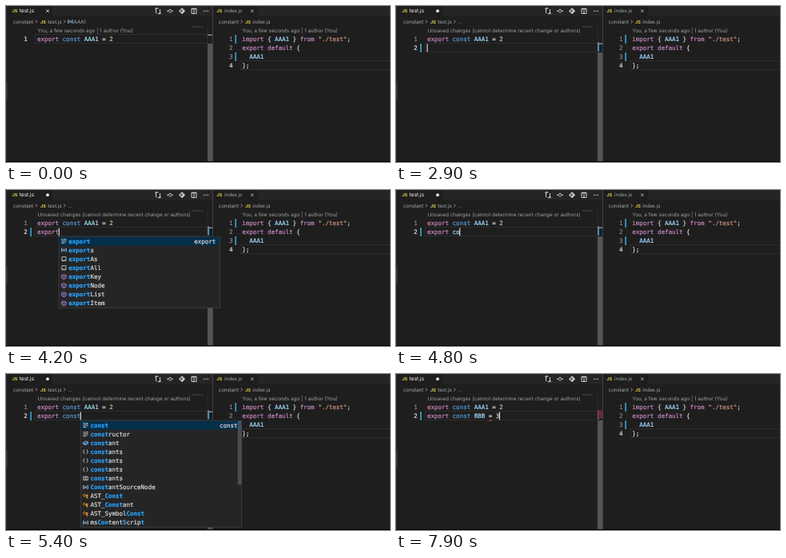
Write an HTML page that moves like this. It is 480 by 195 pixels and loops after 8000 ms.

```html
<!DOCTYPE html>
<html lang="en">
<head>
<meta charset="utf-8">
<title>Editor typing</title>
<style>
  html, body { margin: 0; width: 480px; height: 195px; overflow: hidden; background: #1e1e1e; }
  svg { display: block; text-rendering: geometricPrecision; }
  text { white-space: pre; }
  .ui { font: 6.2px Inter, "Liberation Sans", sans-serif; fill: #acacac; }
  .tab { font-size: 6.5px; fill: #fff; }
  .other { fill: #a8a8a8; }
  .lens { font-size: 6.38px; fill: #a3a3a3; }
  .js { font: 700 5.6px Inter, "Liberation Sans", sans-serif; fill: #e3d04b; }
  .code { font: 7.5px "DejaVu Sans Mono", "Liberation Mono", monospace; color: #dcdcdc; }
  .code, .code tspan { fill: currentColor; stroke: currentColor; stroke-width: .2; }
  .key { color: #c586c0; }
  .decl { color: #569cd6; }
  .name { color: #a4defc; }
  .num { color: #b5cea8; }
  .str { color: #ce9178; }
  .line { color: #858585; }
  .now { color: #e0e0e0; }
  .hit { color: #2aa4ff; font-weight: 700; }
  .icon { fill: none; stroke: #d0d0d0; stroke-width: 1; }
  .thin { stroke-width: .7; }
  .current { fill: none; stroke: #2c2c2c; }
  .changed { fill: #3c93bb; }
</style>
</head>
<body>
<svg id="stage" width="480" height="195" viewBox="0 0 480 195">
  <rect width="480" height="195" fill="#1e1e1e"/>
  <path d="M58 0H258V12.5H58ZM315 0H480V12.5H315Z" fill="#252526"/>
  <rect width="1.6" height="195" fill="#29292a"/>
  <rect y="95" width="1.6" height="22" fill="#3c3c3d"/>
  <path d="M252 25V195" stroke="#2c2c2c" stroke-width=".8"/>
  <rect id="slider" x="252" width="6" height="195" fill="#555"/>
  <path d="M258.5 0V195" stroke="#414141"/>
  <path d="M233 26H246" stroke="#55505c" stroke-width=".9" stroke-dasharray="3 .7"/>
  <rect id="current" class="current" x="36.5" width="215" height="11"/>
  <rect class="current" x="293" y="68.5" width="190" height="11"/>

  <text class="js" x="7.5" y="8.1">JS</text>
  <text class="ui tab" x="16.8" y="8.3">test.js</text>
  <path id="close" class="icon" d="M50.2 4.3L53.9 8M53.9 4.3L50.2 8"/>
  <circle id="dot" cx="52" cy="6.2" r="1.9" fill="#e8e8e8"/>
  <text class="js" x="263.3" y="8.1">JS</text>
  <text class="ui other" x="273" y="8.3">index.js</text>
  <path class="icon thin" d="M306 4.3L309.5 8M309.5 4.3L306 8"/>

  <g class="icon">
    <path d="M187.5 4V9M187.5 3H190.5M192.5 4V9M189.5 9.5H192.5"/>
    <circle cx="187.5" cy="3.4" r=".8"/><circle cx="192.5" cy="9" r=".8"/>
    <path d="M205 4L207.2 6.2L205 8.4L202.8 6.2ZM201 6.2H203M207 6.2H209"/>
    <path d="M220 2.7L223.5 6.2L220 9.7L216.5 6.2Z" fill="#d0d0d0"/>
    <path d="M219 4.6V8M219 5L221 6.4" stroke="#252526"/>
    <path d="M232 3.2H238V9.4H232ZM235 3.2V9.4M232 3.7H238"/>
  </g>
  <path d="M247 6.3H253" stroke="#c5c5c5" stroke-width="1.2" stroke-dasharray="1.2 1.2"/>

  <text class="ui" x="9" y="21.8">constant</text>
  <path class="icon thin" d="M37 17.7L38.8 19.5L37 21.3"/>
  <text class="js" x="43" y="21.6">JS</text>
  <text class="ui" x="52.3" y="21.8">test.js</text>
  <path class="icon thin" d="M72.3 17.7L74.1 19.5L72.3 21.3"/>
  <g id="symbol">
    <path d="M78.8 17.6H77.5V21.4H78.8M82 17.6H83.3V21.4H82M79 18.8H81.8V20.2H79Z" fill="none" stroke="#8fbfe6" stroke-width=".8"/>
    <text class="ui" x="84.6" y="21.8">AAA1</text>
  </g>
  <text id="more" class="ui" x="77" y="21.8">...</text>
  <text class="ui" x="265.6" y="21.8">constant</text>
  <path class="icon thin" d="M293.7 17.7L295.5 19.5L293.7 21.3"/>
  <text class="js" x="299" y="21.6">JS</text>
  <text class="ui" x="308.2" y="21.8">index.js</text>

  <text id="lens" class="ui lens" x="39.5" y="32.6"></text>
  <text class="ui lens" x="295.3" y="32.6">You, a few seconds ago | 1 author (You)</text>
  <g id="right"></g>
  <g id="left"></g>
  <path id="deleted" d="M29.8 44L32 45.8L29.8 47.5Z" fill="#94151b"/>
  <g id="added" class="changed">
    <rect x="30.2" y="47" width="1.8" height="11"/>
    <rect x="252" y="45.5" width="2" height="11"/>
  </g>
  <path class="changed" d="M286.2 36H288V47H286.2ZM286.2 58H288V69H286.2Z"/>
  <rect id="mark" x="252" width="6" height="1.5" fill="#8a8a8c"/>
  <rect id="fault" x="252.5" y="45.5" width="5.5" height="10" fill="#6e2730"/>
  <path id="wave" d="M116 58.2H120.5" stroke="#b05252"/>
  <rect id="cursor" width="1.1" height="9.8" fill="#e4e4e4"/>
  <g id="popup"></g>
  <rect y="194" width="480" height="1"/>
</svg>
<script>
const LOOP = 8000, CHAR = 4.516, LEFT = 39, RIGHT = 295.3, PITCH = 11, ROW = 11.08, MAX_ROWS = 12;
const $ = id => document.getElementById(id);
const span = (cls, s) => `<tspan class="${cls}">${s}</tspan>`;
const baseline = n => 43.7 + (n - 1) * PITCH;
const text = (cls, x, y, s, extra = "") => `<text class="${cls}" x="${x}" y="${y}" ${extra}>${s}</text>`;
const show = (id, on) => $(id).style.display = on ? "" : "none";

// Start time, second line, popup open
const TYPING = [
  [2600, ""], [3300, "e", 1], [3500, "ex", 1], [3700, "exp", 1], [3900, "expo", 1],
  [4000, "expor", 1], [4100, "export", 1], [4400, "export "], [4700, "export c"],
  [4800, "export co"], [4900, "export con", 1], [5100, "export cons", 1],
  [5200, "export const", 1], [5500, "export const "], [6000, "export const B"],
  [6200, "export const BB"], [6300, "export const BBB"], [6700, "export const BBB "],
  [7100, "export const BBB ="], [7400, "export const BBB = "], [7800, "export const BBB = 3"]
];

// Each word follows its icon kind; total is the full length of the scrolled list
const list = s => s.split(" ").map(item => item.split(":"));
const WORDS = {
  e: { total: 50, words: list(
    "k:export v:exports k:extends v:external s:exa s:exd s:exp s:expgql m:exec m:exec m:execFile m:execFileSync " +
    "s:exportAs s:exportAll m:exportKey m:exportNode m:exportList m:exportItem") },
  c: { total: 20, words: list(
    "k:const k:constructor f:constant o:constants o:constants o:constants t:constants v:ConstantSourceNode " +
    "c:AST_Const c:AST_Constant c:AST_SymbolConst v:msContentScript") }
};

const ICONS = {
  k: ["#c5c5c5", "M-3 -2.5H-1M0 -2.5H3M-3 -.8H3M-3 1H0M1 1H3M-3 2.7H1"],
  v: ["#8fbfe6", "M-1.8 -2H-3V2H-1.8M1.8 -2H3V2H1.8M-1.4 -.7H1.4V.8H-1.4Z"],
  s: ["#c5c5c5", "M-2.5 -2.5H2.5V2.5H-2.5ZM-2.5 2H2.5"],
  t: ["#c5c5c5", "M-2.8 -2.2H2.8V2.2H-2.8ZM-1.4 -.7H1.4M-1.4 .8H1.4"],
  m: ["#b180d7", "M0 -3L2.8 -1.5V1.7L0 3.2L-2.8 1.7V-1.5ZM-2.8 -1.5L0 0L2.8 -1.5M0 0V3.2"],
  f: ["#75beff", "M-3 -.5L.5 -2.2L3 -1V1L-.5 2.6L-3 1.3ZM-3 -.5L-.5 .7L3 -1M-.5 .7V2.6"],
  o: ["#c5c5c5", "M-1.2 -2.6Q-2.3 -2.6 -2.2 -1Q-2.2 0 -3 0Q-2.2 0 -2.2 1Q-2.3 2.6 -1.2 2.6M1.2 -2.6Q2.3 -2.6 2.2 -1Q2.2 0 3 0Q2.2 0 2.2 1Q2.3 2.6 1.2 2.6"],
  c: ["#ee9d28", "M-1.5 -2.6L.2 -.9L-1.5 .8L-3.2 -.9ZM0 -.9H2.5M1 -.9V1.8H2.5M2 -1.7L3 -.9L2 0ZM2 1L3 1.8L2 2.6Z"]
};

function paint(line) {
  const colours = { export: "key", import: "key", default: "key", from: "key", const: "decl" };
  return line.replace(/"[^"]*"|[A-Za-z]\w*|\d+/g, s =>
    span(s[0] === '"' ? "str" : /^\d/.test(s) ? "num" : colours[s] || "name", s));
}

function highlight(word, typed) {
  const low = word.toLowerCase(), at = low.indexOf(typed);
  let k = 0;
  return [...word].map((ch, i) => {
    const hit = at >= 0 ? i >= at && i < at + typed.length : low[i] === typed[k];
    if (hit) k++;
    return hit ? span("hit", ch) : ch;
  }).join("");
}

function popup(x, typed) {
  const top = 58.2, width = 201.5;
  const { total, words } = WORDS[typed[0]];
  const loose = new RegExp([...typed].join(".*"), "i");
  const rows = words.filter(([, word]) => loose.test(word)).slice(0, MAX_ROWS);
  const height = rows.length * ROW;
  let out = `<rect x="${x}" y="${top}" width="${width}" height="${height + .4}" fill="#252526" stroke="#454545" stroke-width=".7"/>
    <rect x="${x + .4}" y="${top + .3}" width="${width - .8}" height="${ROW}" fill="#062f4a"/>`;
  rows.forEach(([kind, word], i) => {
    const y = top + .2 + ROW * (i + .5), [colour, d] = ICONS[kind];
    out += `<path transform="translate(${x + 6.3} ${y})" d="${d}" fill="none" stroke="${colour}" stroke-width=".9"/>`;
    out += text("code", x + 12.2, y + 2.6, highlight(word, typed));
  });
  if (rows.length === MAX_ROWS)
    out += `<rect x="${x + width - 5}" y="${top + .3}" width="4.7" height="${height * MAX_ROWS / total}" fill="#797979" opacity=".5"/>`;
  return out + text("code", x + 196.3, top + ROW / 2 + 2.8, rows[0][1], 'text-anchor="end"');
}

const lineNo = (x, n, current) => text("code line" + (current ? " now" : ""), x, baseline(n), n, 'text-anchor="end"');

$("right").innerHTML = ['import { AAA1 } from "./test";', "export default {", "  AAA1", "};"]
  .map((s, i) => lineNo(283.5, i + 1, i === 3) + text("code", RIGHT, baseline(i + 1), paint(s))).join("");

function draw(step) {
  const first = "export const AAA1 = 2", dirty = step >= 0;
  const [, line, open] = dirty ? TYPING[step] : [0, first];
  const x = LEFT + line.length * CHAR, top = dirty ? 36 + PITCH : 36;
  $("left").innerHTML = lineNo(26.8, 1, !dirty) + text("code", LEFT, baseline(1), paint(first)) +
    (dirty ? lineNo(26.8, 2, true) + text("code", LEFT, baseline(2), paint(line)) : "");
  $("lens").textContent = dirty ? "Unsaved changes (cannot determine recent change or authors)"
                                : "You, a few seconds ago | 1 author (You)";
  show("close", !dirty);
  show("symbol", !dirty);
  ["dot", "more", "added"].forEach(id => show(id, dirty));
  const fault = line.includes("BBB =");
  show("fault", fault);
  show("wave", fault);
  $("current").setAttribute("y", top - .5);
  $("mark").setAttribute("y", top - .5);
  $("slider").setAttribute("y", top + PITCH);
  $("cursor").setAttribute("x", x - .4);
  $("cursor").setAttribute("y", top + .5);
  $("popup").innerHTML = open ? popup(x, line.split(" ").pop()) : "";
}

const start = performance.now();
let shown = null;
function frame() {
  const t = (performance.now() - start) % LOOP;
  const step = TYPING.filter(s => s[0] <= t).length - 1;
  if (step !== shown) draw(shown = step);
  const lit = step < 0 ? t >= 500 && (t - 500) % 1000 < 600 : (t - TYPING[step][0]) % 1000 < 500;
  show("cursor", lit);
  show("deleted", step < 0 && t >= 500);
  requestAnimationFrame(frame);
}
frame();
</script>
</body>
</html>
```
